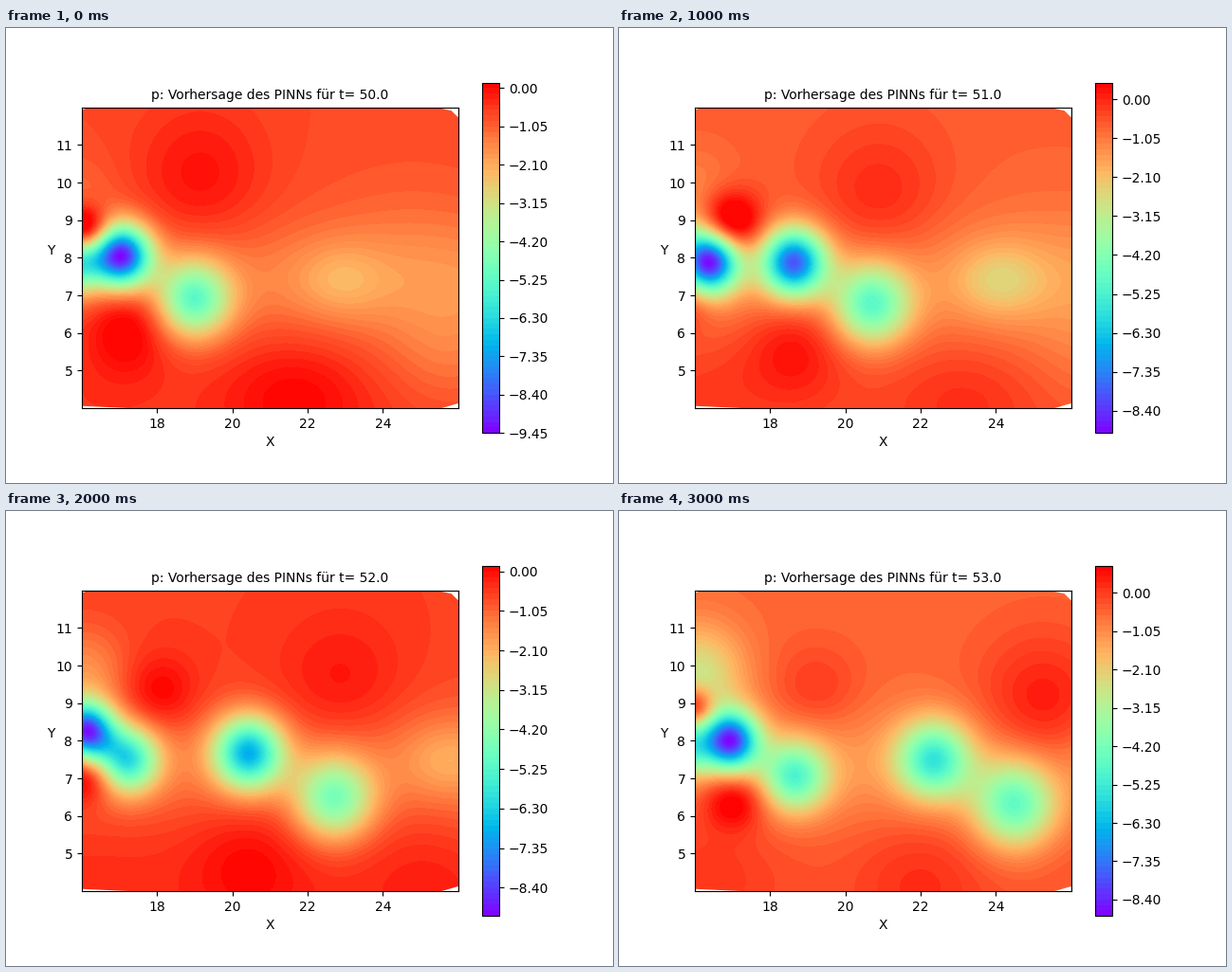
Write a matplotlib script that moves like this. It is 640 by 480 pixels and loops after 3100 ms.

```python
import numpy as np
import matplotlib.pyplot as plt
from matplotlib.animation import FuncAnimation
from matplotlib.patches import Polygon

FRAMES, INTERVAL = 31, 100
STEP = 0.15
KEYS = [0, 0.4, 1, 1.4, 2, 2.4, 3]
LEVEL_KEYS = [0, 0.4, 1, 1.4, 1.6, 2, 2.4, 3]
TOPS = [0.15, 0.3, 0.45, 0.3, 0.15, 0.15, 0.15, 0.75]
BOTTOMS = [-9.45, -9.15, -9.0, -8.4, -8.1, -9.15, -9.15, -8.85]

X, Y = np.meshgrid(np.linspace(16, 26, 241), np.linspace(4, 12, 193))

# Each feature: x track, y track, pressure at its centre, width track, height/width
LOWS = [
    ((17.05, 18.63, 20.43, 22.35), (8.05, 7.88, 7.68, 7.5),
     (-9.4, -8.0, -6.95, -5.5), (0.55, 0.68), 1.05),
    ((18.97, 20.7, 22.7, 24.5), (6.9, 6.75, 6.45, 6.3),
     (-5.3, -4.95, -4.65, -4.6), (0.68, 0.76), 1.05),
    ((22.85, 24.1, 25.7, 27.2), (7.4, 7.4, 7.5, 7.6),
     (-2.35, -2.55, -2.1, -1.5), (0.8, 0.8), 0.85),
    ((15.8, 16.4, 17.2, 18.65), (7.85, 7.9, 7.5, 7.05),
     (-5.9, -8.9, -6.3, -5.0), (0.5, 0.62), 1.05),
    ((15.1, 15.55, 16.1, 16.95), (9.0, 8.6, 8.25, 8.0),
     (-1, -1.5, -3.5, -6.8, -9.0, -9.1, -8.8), (0.5, 0.52), 1.05),
    ((13.9, 15.7), (7.8, 7.8),
     (-1, -1, -1, -1, -1, -1.5, -5.2), (0.5, 0.5), 1),
    ((16, 16.1), (9.7, 9.75),
     (-1, -0.95, -1.2, -1.7, -1.9, -2.1, -2.6), (0.7, 0.85), 1.1),
]
HIGHS = [
    ((17.2, 18.65, 20.45, 22), (6.3, 5.75, 4.75, 4.2),
     (0.1, 0.15, 0.1, 0.2), (0.8, 1.2), 1.1),
    ((16.1, 16.95, 18.05, 19.2), (8.72, 8.9, 9.25, 9.3),
     (-0.2, 0.28, 0.42, 0.28, 0.05, -0.05, -0.05), (0.42, 0.85), 1),
    ((19.15, 20.9, 22.9, 25.25), (10.1, 9.5, 9.3, 8.7),
     (-0.1, -0.1, -0.2, 0.25), (1.2, 1.2), 1.15),
    ((21.7, 23.2, 25.3, 27), (4.3, 4.2, 4.5, 4.5),
     (0.12, -0.1, -0.25, -0.3), (1.35, 1.2), 0.85),
    ((15.3, 15.7, 16.1, 17.05), (6.2, 6.7, 7.1, 6.45),
     (-0.6, -0.6, -0.6, -0.7, -0.6, 0.1, 0.7), (0.45, 0.6), 0.9),
    ((13, 16), (8.9, 8.9),
     (-1, -1, -1, -1, -1, -0.9, -0.2), (0.35, 0.35), 1),
    ((16.3, 16.3), (4.6, 4.6),
     (-0.4, -0.25, -0.4, 0.1), (1.2, 1.4), 1),
]
FEATURES = LOWS + HIGHS

# Gaps between the data hull and the axes rectangle
CORNERS = [
    [(25.4, 12), (25.82, 11.91), (26, 11.73), (26, 12)],
    [(16, 12), (16.2, 12), (16, 11.93)],
    [(16, 4), (16, 4.06), (17.3, 4)],
    [(25.55, 4), (26, 4.13), (26, 4)],
]


def track(vals, t):
    if len(vals) == len(KEYS):
        return np.interp(t, KEYS, vals)
    knots = np.linspace(0, 3, len(vals))
    return np.polyval(np.polyfit(knots, vals, len(vals) - 1), t)


def gauss(x, y, cx, cy, sx, sy):
    return np.exp(-0.5 * (((x - cx) / sx) ** 2 + ((y - cy) / sy) ** 2))


def background(x, y, t):
    fade = 1 - t / 3
    p = -0.75 + 0.07 * t
    p = p - 0.7 * np.exp(-0.5 * ((y - 7.4) / 1.1) ** 2)
    p = p + 0.2 * np.exp(-0.5 * ((y - 4) / 1.5) ** 2)
    p = p - 0.4 * fade * gauss(x, y, 24.8 + 0.8 * t, 7.8, 2, 1.9)
    return p - 0.55 * fade * gauss(x, y, 25.8 + 0.8 * t, 5.4, 1.2, 1.1)


def pressure(t):
    """Moving Gaussians weighted so that each centre has its given pressure."""
    cx, cy, val, sx = (np.array([track(f[i], t) for f in FEATURES])
                       for i in range(4))
    sy = sx * np.array([f[4] for f in FEATURES])
    mix = gauss(cx[:, None], cy[:, None], cx, cy, sx, sy)
    weights = np.linalg.solve(mix, val - background(cx, cy, t))
    p = background(X, Y, t)
    for w, *shape in zip(weights, cx, cy, sx, sy):
        p = p + w * gauss(X, Y, *shape)
    return p


def draw(i):
    t = i / 10
    lo = round(np.interp(t, LEVEL_KEYS, BOTTOMS) / STEP)
    hi = round(np.interp(t, LEVEL_KEYS, TOPS) / STEP)
    levels = np.round(np.arange(lo, hi + 1) * STEP, 2)
    p = np.clip(pressure(t), levels[0] + 1e-3, levels[-1] - 1e-3)

    fig.clear()
    ax = fig.add_subplot()
    cs = ax.contourf(X, Y, p, levels=levels, cmap="rainbow")
    for pts in CORNERS:
        ax.add_patch(Polygon(pts, fc="white", ec="none", zorder=2))
    ax.set_aspect("equal")
    ax.set_xlim(16, 26)
    ax.set_ylim(4, 12)
    ax.set_xticks(range(18, 25, 2))
    ax.set_yticks(range(5, 12))
    ax.set_xlabel("X")
    ax.set_ylabel("Y", rotation=0)
    ax.set_title(f"p: Vorhersage des PINNs für t= {50 + t:.1f}", fontsize=10)
    fig.colorbar(cs, ax=ax)
    return []


fig = plt.figure(figsize=(6.4, 4.8), dpi=100)
anim = FuncAnimation(fig, draw, frames=FRAMES, interval=INTERVAL, repeat=True)
plt.show()
```
